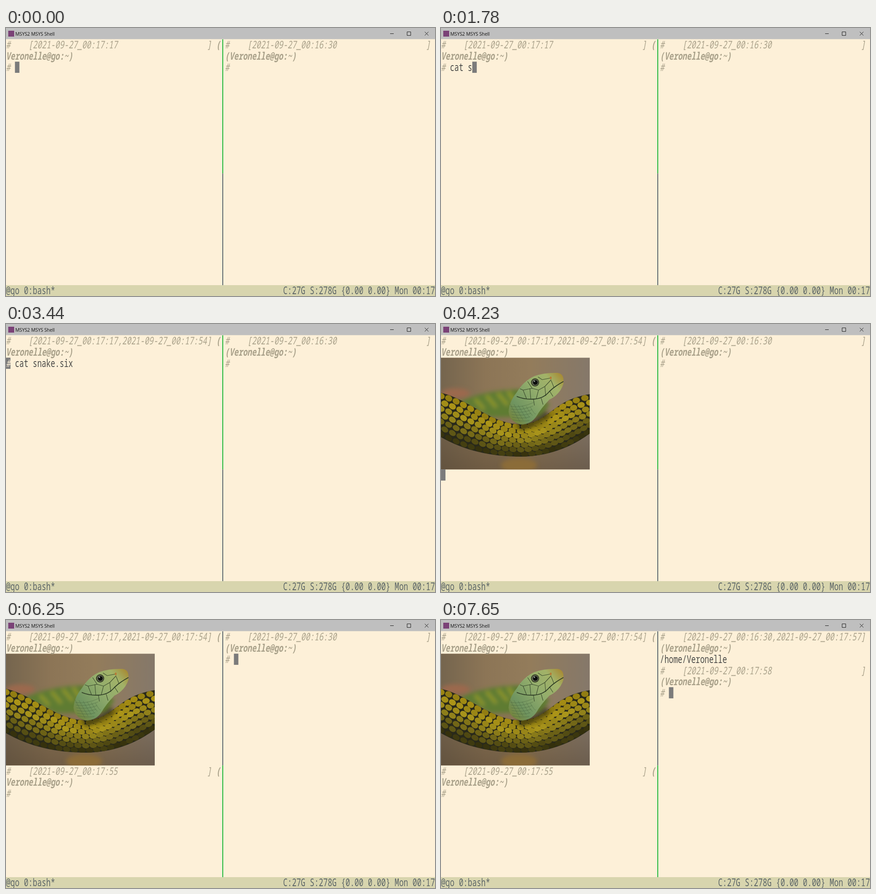
An HTML page for the animation above (8 s loop, 946 by 592 pixels).

```html
<!DOCTYPE html>
<html lang="en">
<head>
<meta charset="utf-8">
<title>Terminal</title>
<style>
  html, body { margin: 0; width: 100%; height: 100%; overflow: hidden; background: #fdf0d8; }
  svg { display: block; width: 946px; height: 592px; }
  .term text { font: 23px "Noto Sans Mono", monospace; white-space: pre; fill: #4a4a48; }
  .term .dim { font-style: italic; fill: #aaa28b; }
  .term .user { font-style: italic; font-weight: 700; fill: #a8a089; }
  .term .bar { fill: #5c6567; }
  .term .inv { font-style: italic; fill: #fdf0d8; }
  .title { font: 10.3px "Open Sans", sans-serif; fill: #111; }
</style>
</head>
<body>
<svg viewBox="0 0 946 592" xmlns="http://www.w3.org/2000/svg">
  <defs>
    <linearGradient id="wall">
      <stop offset="0" stop-color="#75654e"/>
      <stop offset=".3" stop-color="#8c7556"/>
      <stop offset=".6" stop-color="#937c5b"/>
      <stop offset="1" stop-color="#85786a"/>
    </linearGradient>
    <linearGradient id="shade" x2="0" y2="1">
      <stop offset=".45" stop-color="#4c3c2c" stop-opacity="0"/>
      <stop offset="1" stop-color="#4c3c2c" stop-opacity=".45"/>
    </linearGradient>
    <linearGradient id="skin" gradientUnits="userSpaceOnUse" x1="155" y1="215" x2="272" y2="112">
      <stop offset="0" stop-color="#76843a"/>
      <stop offset=".2" stop-color="#6f9460"/>
      <stop offset=".55" stop-color="#93ad6c"/>
      <stop offset=".8" stop-color="#a2b268"/>
      <stop offset="1" stop-color="#a8852c"/>
    </linearGradient>
    <filter id="soft" x="-30%" y="-30%" width="160%" height="160%"><feGaussianBlur stdDeviation="5"/></filter>
    <clipPath id="frame"><rect y="74.4" width="328" height="246.8"/></clipPath>
    <clipPath id="bodyClip"><path id="bodyEdge"/></clipPath>
  </defs>

  <rect width="946" height="592" fill="#fdf0d8"/>
  <rect width="946" height="24.6" fill="#bfbfbf"/>
  <rect x="5" y="6" width="13" height="13" fill="#7b4277"/>
  <text class="title" x="20.5" y="16.6">MSYS2 MSYS Shell</text>
  <path d="M847 12.5h8M884.5 8.5h8v8h-8zM923.5 8.5l8 8m0-8l-8 8" fill="none" stroke="#222"/>
  <rect y="568" width="946" height="24" fill="#d8d5ae"/>
  <rect id="sepTop" x="477" y="25" width="2" height="296.2"/>
  <rect id="sepLow" x="477" y="321.2" width="2" height="246.8"/>

  <g id="photo" clip-path="url(#frame)">
    <rect y="74" width="328" height="248" fill="url(#wall)"/>
    <rect y="74" width="328" height="248" fill="url(#shade)"/>
    <g filter="url(#soft)">
      <ellipse cx="32" cy="153" rx="32" ry="11" fill="#9b694d"/>
      <ellipse cx="172" cy="312" rx="40" ry="16" fill="#8b6c38"/>
      <path d="M40 172Q95 146 172 144L240 176L222 205L110 206Z" fill="#5f7b32"/>
      <path d="M75 166l20 22M100 158l22 26M125 153l22 26M148 149l14 22" stroke="#91982f" stroke-width="7"/>
    </g>
    <use href="#bodyEdge" fill="#29291a"/>
    <g id="scales" clip-path="url(#bodyClip)"></g>
    <path d="M165 219Q205 216 232 192L240 204Q212 228 175 236Z" fill="#20200f" opacity=".6" filter="url(#soft)"/>
    <path d="M270 121Q268 109 257 108Q228 107 206 115Q182 126 167 151Q150 172 149 194Q151 216 176 222Q199 222 211 203Q220 187 239 167Q263 155 270 132Z" fill="url(#skin)"/>
    <g fill="none" stroke="#2d3b24">
      <path d="M270 127Q250 138 239 149Q226 165 204 166Q184 167 167 160" stroke-width="1.8"/>
      <path d="M191 127l10 15 14 4 14-8 14-15M201 142l-20 4M215 146l-5 19M229 138l2 21M243 125l6 15M181 146l8 20M214 117l9 6 20-4M181 146l-7-3M196 142l2 24M240 149l7 11M221 164l4 14M204 167l2 13" stroke-width="1.1" opacity=".85"/>
    </g>
    <path id="neck" fill="none" stroke="#445f3c" stroke-width=".8" opacity=".6"/>
    <circle cx="207.5" cy="129" r="9" fill="#353c24"/>
    <circle cx="207.5" cy="129" r="7" fill="#69705a"/>
    <circle cx="208" cy="129" r="5.3" fill="#0d0f0d"/>
    <circle cx="206" cy="126.5" r="1.3" fill="#c3cbc4"/>
    <ellipse cx="242" cy="119" rx="2" ry="3" fill="#b87935"/>
  </g>

  <rect id="cursor" width="9.85" height="24.68" fill="#7b7b7b"/>
  <g id="term" class="term"></g>
  <path id="pointer" d="M0 0V14.2L3.2 11.2L5.8 17L8.2 16L5.7 10.3H10Z" fill="#0b0b0b"/>
</svg>
<script>
const LOOP = 8000, COLS = 96, CELL = 946 / COLS, ROW = 24.68, TOP = 25;
const ADVANCE = 23 * 0.6;               // one character of the terminal face
const RIGHT = 49;                       // first column of the right pane
const USER = 'Veronelle', DAY = '2021-09-27_00:';
const LEFT_KEYS = [180, 580, 780, 1380, 1780, 2000, 2230];
const RIGHT_KEYS = [6450, 6650, 6850];
const $ = id => document.getElementById(id);

$('term').setAttribute('transform', `scale(${CELL / ADVANCE} 1)`);

const put = (col, row, str, cls = '') =>
  `<text x="${col * ADVANCE}" y="${TOP + row * ROW + 20.5}" class="${cls}">${str}</text>`;

function prompt(col, row, start, end) {
  const span = DAY + start + (end ? ',' + DAY + end : '');
  const head = put(col, row, '#', 'dim') + put(col + 5, row, '[' + span, 'dim') + put(col + 45, row, ']', 'dim');
  const who = USER + '@go:~)';
  return head + (col
    ? put(col, row + 1, '(' + who, 'user')
    : put(47, row, '(', 'user') + put(0, row + 1, who, 'user'));
}

const pressed = (keys, t) => keys.filter(k => k <= t).length;

function leftPane(t) {
  let out = prompt(0, 0, '17:17', t >= 3440 && '17:54'), cursor;
  if (t < 4230) {
    const line = 'cat snake.six ';
    const cmd = t >= 2450 ? line : line.slice(0, pressed(LEFT_KEYS, t));
    const ran = t >= 3440;
    out += put(0, 2, '#', ran ? 'inv' : 'dim') + put(2, 2, cmd);
    cursor = [ran ? 0 : 2 + cmd.length, 2];
  } else if (t < 4650) {
    cursor = [0, 12];
  } else {
    out += prompt(0, 12, '17:55') + put(0, 14, '#', 'dim');
    cursor = [2, 14];
  }
  return { out, cursor };
}

function rightPane(t) {
  const ran = t >= 7050;
  let out = prompt(RIGHT, 0, '16:30', ran && '17:57'), cursor;
  if (t < 7250) {
    const cmd = 'pwd'.slice(0, pressed(RIGHT_KEYS, t));
    out += put(RIGHT, 2, '#', ran ? 'inv' : 'dim') + put(RIGHT + 2, 2, cmd);
    cursor = [ran ? RIGHT : RIGHT + 2 + cmd.length, 2];
  } else {
    out += put(RIGHT, 2, '/home/' + USER);
    cursor = [RIGHT, 3];
    if (t >= 7650) {
      out += prompt(RIGHT, 3, '17:58') + put(RIGHT, 5, '#', 'dim');
      cursor = [RIGHT + 2, 5];
    }
  }
  return { out, cursor };
}

const load = 'C:27G S:278G {0.00 0.00} Mon 00:17';
const status = put(0, 22, '@go 0:bash*', 'bar') + put(COLS - load.length, 22, load, 'bar');

// Snake body: two edges of two cubic curves each, filled with staggered scales.
const EDGE_TOP = [[0, 152], [62, 166], [110, 222], [180, 222], [240, 216], [245, 168], [328, 155]];
const EDGE_LOW = [[0, 250], [60, 284], [120, 293], [180, 293], [240, 292], [290, 270], [328, 242]];

function along(edge, u) {
  const i = u < 1 ? 0 : 3, s = u < 1 ? u : u - 1, r = 1 - s;
  return [0, 1].map(k => r * r * r * edge[i][k] + 3 * r * r * s * edge[i + 1][k] +
    3 * r * s * s * edge[i + 2][k] + s * s * s * edge[i + 3][k]);
}

function drawSnake() {
  const curve = p => `C${p.slice(1, 4)} ${p.slice(4)}`;
  const back = [...EDGE_LOW].reverse();
  $('bodyEdge').setAttribute('d', `M${EDGE_TOP[0]}${curve(EDGE_TOP)}L${back[0]}${curve(back)}Z`);

  const rows = 7, step = 0.093;
  const spot = (u, v) => {
    const a = along(EDGE_TOP, u), b = along(EDGE_LOW, u);
    return a.map((p, k) => p + (b[k] - p) * v);
  };
  let out = '';
  for (let r = 0; r < rows; r++) {
    const v = (r + 0.5) / rows;
    for (let n = 0; n < 22; n++) {
      const u = Math.min(2, (n + (r % 2) / 2) * step);
      const [x, y] = spot(u, v), [x2, y2] = spot(u + 0.01, v);
      const tilt = Math.atan2(y2 - y, x2 - x) * 180 / Math.PI + 10;
      const light = 39 - 20 * Math.abs(v - 0.32) - 14 * v * v + 2 * Math.sin(n * 5 + r * 3);
      out += `<ellipse rx="8.2" ry="${6.7 - v}" transform="translate(${x} ${y}) rotate(${tilt})" ` +
        `fill="hsl(${50 + 4 * v} ${80 - 22 * v}% ${light}%)"/>`;
    }
  }
  $('scales').innerHTML = out;

  let d = '';
  for (let i = 0; i < 6; i++) {
    d += `M${152 + i * 9} ${176 + i * 1.5}q10 18 ${22 - i * 2} ${40 - i * 5}`;
    d += `M${153 + i} ${182 + i * 6}q24 4 ${52 - i * 3} ${-9 + i * 2}`;
  }
  $('neck').setAttribute('d', d);
}

function pointerAt(t) {
  if (t < 5050 || t >= 6250) return null;
  return t < 5240 ? [466, 222] : t < 5440 ? [583.4, 175] : [584.2, 175];
}

let shown = '';
function draw(t) {
  const left = leftPane(t), right = rightPane(t), onRight = t >= 5650;
  const text = left.out + right.out + status;
  if (text !== shown) $('term').innerHTML = shown = text;

  const [col, row] = (onRight ? right : left).cursor;
  $('cursor').setAttribute('x', col * CELL);
  $('cursor').setAttribute('y', TOP + row * ROW);
  $('sepTop').setAttribute('fill', onRight ? '#5d6b70' : '#22b83c');
  $('sepLow').setAttribute('fill', onRight ? '#22b83c' : '#5d6b70');
  $('photo').style.display = t >= 4230 ? '' : 'none';

  const tip = pointerAt(t);
  $('pointer').style.display = tip ? '' : 'none';
  if (tip) $('pointer').setAttribute('transform', `translate(${tip})`);
}

function tick() {
  draw(performance.now() % LOOP);
  requestAnimationFrame(tick);
}

drawSnake();
tick();
</script>
</body>
</html>
```
